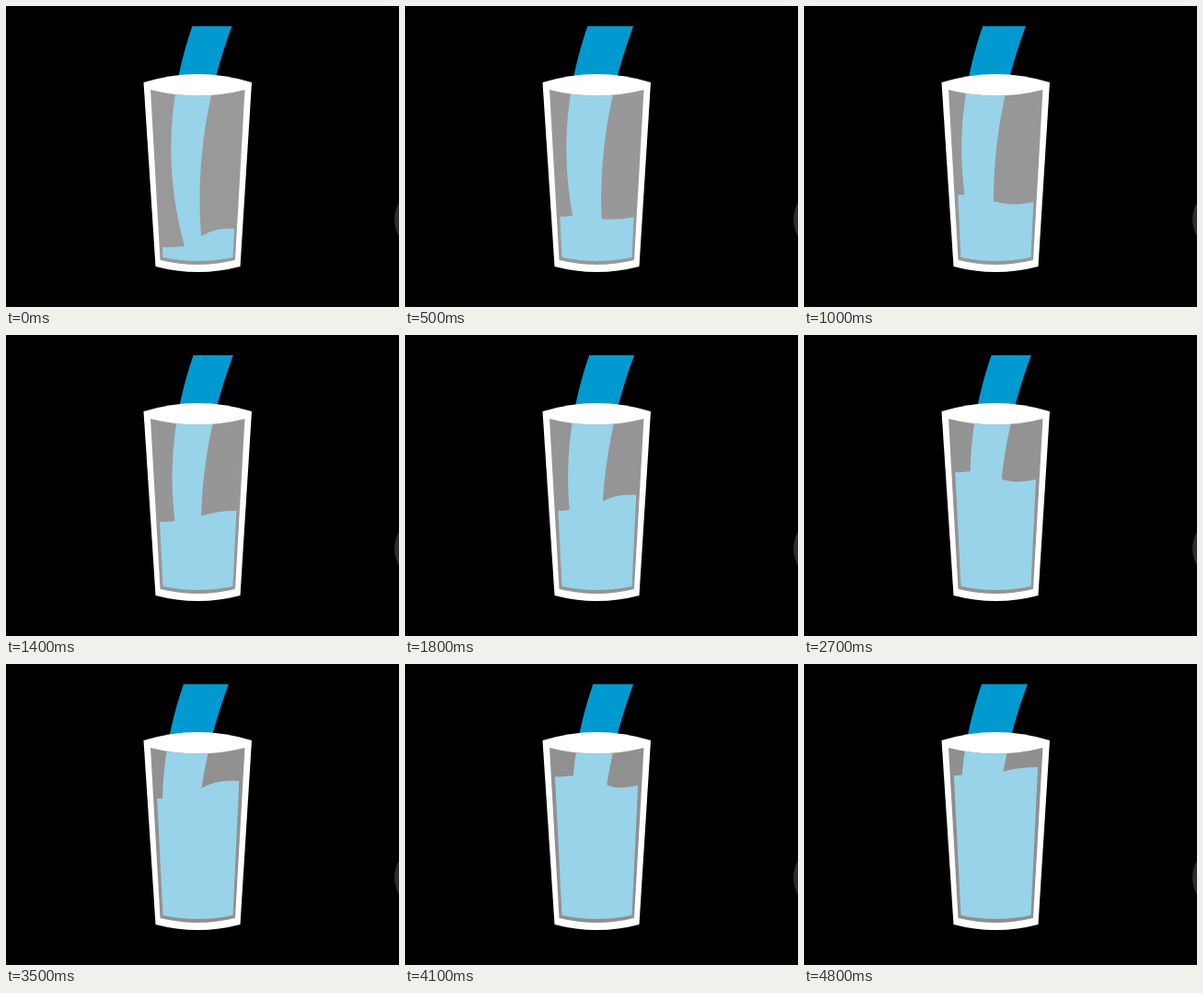
An HTML page with a canvas that plays this animation: 427x327 px, repeating every 4.85 s.

```html
<!DOCTYPE html>
<html lang="en">
<head>
<meta charset="utf-8">
<title>Filling a glass</title>
<style>
  html, body { margin: 0; width: 100%; height: 100%; overflow: hidden; background: #000; }
  canvas { display: block; }
</style>
</head>
<body>
<canvas id="stage" width="427" height="327"></canvas>
<script>
const ctx = document.getElementById('stage').getContext('2d');
const LOOP = 4850, TICK = 50, FPS = 15, TOP = 22;
const TAU = 2 * Math.PI;

// Filling curve: [step, mean water level, sideways tilt bias]
const LEVELS = [
  [0, 252, 5], [15, 209, 4.7], [21, 197, 5.3], [33, 167.5, 1.1],
  [41, 153, 3.7], [53, 136.5, 5.8], [72, 116.5, 2.3]
];

function levelAt(n, col) {
  const i = Math.max(1, LEVELS.findIndex(k => k[0] >= n));
  const a = LEVELS[i - 1], b = LEVELS[i];
  return a[col] + (b[col] - a[col]) * (n - a[0]) / (b[0] - a[0]);
}

// Four corners with curved top and bottom edges
function cup(xl, xr, top, topBend, bl, br, bottom, bottomBend) {
  const p = new Path2D();
  p.moveTo(xl, top);
  p.quadraticCurveTo((xl + xr) / 2, topBend, xr, top);
  p.lineTo(br, bottom);
  p.quadraticCurveTo((bl + br) / 2, bottomBend, bl, bottom);
  p.closePath();
  return p;
}

const glass = cup(149.5, 267, 83, 65, 162.5, 254.5, 283, 295);
const inside = cup(157, 259.5, 91, 104, 167.5, 249, 276, 286);

const parabola = (y, depth, low) => depth * (((y - low) / (low - TOP)) ** 2 - 1);
const wallLeft = y => 170.5 - (273 - y) * 0.05;
const wallRight = y => 246.5 + (273 - y) * 0.047;

// Falling stream and the body of water as one outline
function water(n) {
  const sway = TAU * n / 20;
  const topLeft = 198.7 + 5.8 * Math.cos(sway - 0.14 * TAU);
  const topRight = 245.5 + 4.5 * Math.sin(sway);
  const edgeLeft = y => topLeft + parabola(y, 23, 155);
  const edgeRight = y => topRight + parabola(y, 35, 210);

  const tilt = 15 * Math.cos(TAU * n / 25.5) + levelAt(n, 2);
  const left = levelAt(n, 1) + tilt / 2;
  const right = left - tilt;
  const foot = right + 2 + 0.3 * tilt;

  const p = new Path2D();
  p.moveTo(topLeft, TOP);
  for (let y = TOP; y < left; y += 4) p.lineTo(edgeLeft(y), y);
  p.lineTo(edgeLeft(left - 1), left - 1);
  p.quadraticCurveTo(wallLeft(left) + 8, left + 0.5, wallLeft(left), left);
  p.lineTo(170.5, 273);
  p.quadraticCurveTo(208.5, 281, 246.5, 273);
  p.lineTo(wallRight(right), right);
  p.quadraticCurveTo(229, right + 3 - 0.25 * tilt, edgeRight(foot), foot);
  for (let y = foot; y > TOP; y -= 4) p.lineTo(edgeRight(y), y);
  p.lineTo(topRight, TOP);
  p.closePath();
  return p;
}

function fill(path, color) {
  ctx.fillStyle = color;
  ctx.fill(path);
}

const badge = new Path2D();
badge.arc(457, 232, 35, 0, TAU);

function draw(now) {
  const t = Math.floor(now % LOOP / TICK) * TICK;
  const n = Math.floor((t + TICK - 1) * FPS / 1000);
  const shape = water(n);
  const grey = Math.round(153 - n / 7);

  ctx.fillStyle = '#000';
  ctx.fillRect(0, 0, 427, 327);
  fill(badge, '#28302e');
  fill(shape, '#0099d0');
  fill(glass, '#fff');
  fill(inside, `rgb(${grey},${grey},${grey})`);
  ctx.save();
  ctx.clip(inside);
  fill(shape, '#99d3e9');
  ctx.restore();
  requestAnimationFrame(draw);
}
requestAnimationFrame(draw);
</script>
</body>
</html>
```
